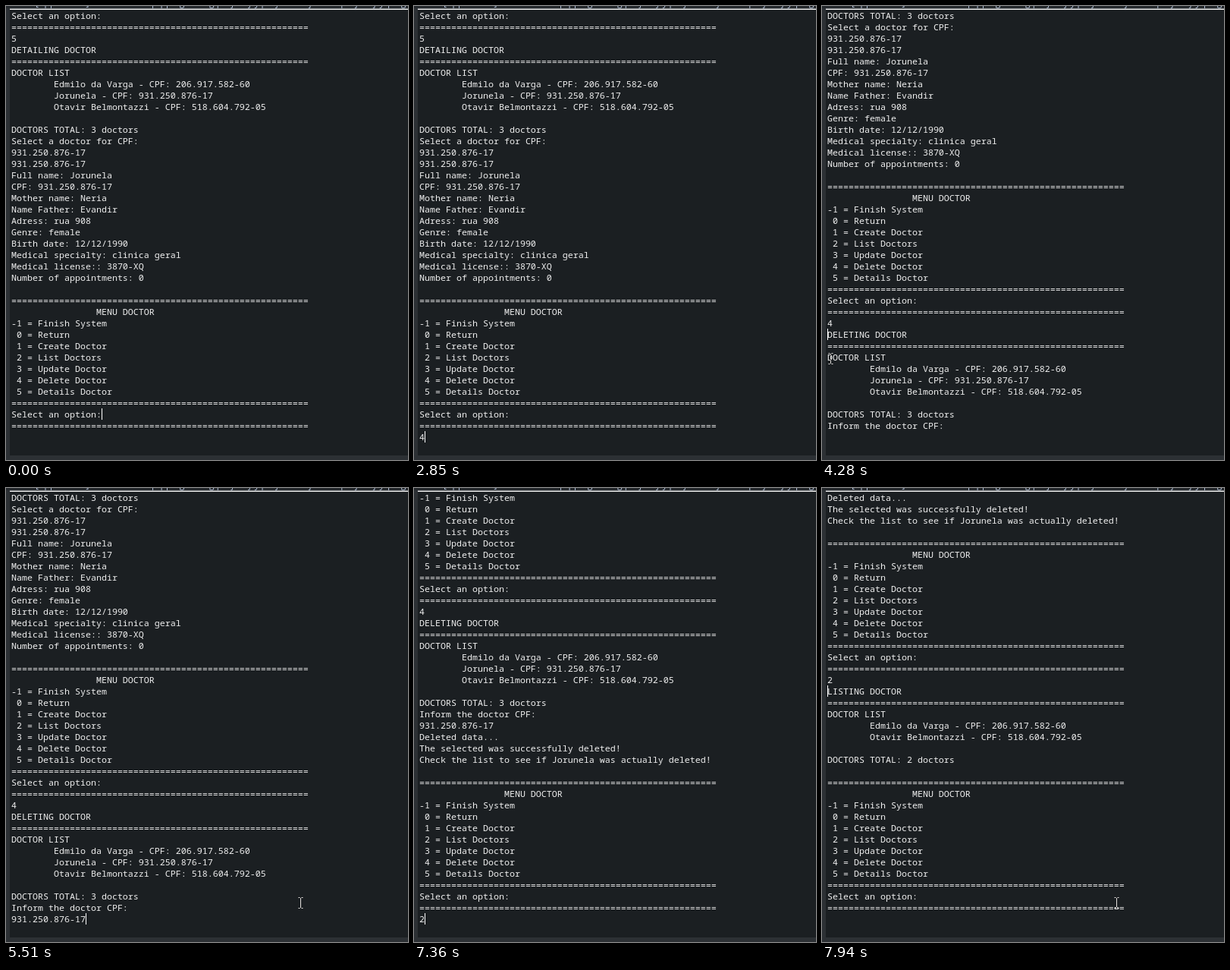
An HTML page that plays this animation: 530x598 px, repeating every 8 s.

```html
<!DOCTYPE html>
<html lang="en">
<head>
<meta charset="utf-8">
<title>Console session</title>
<style>
  html, body { margin: 0; width: 100%; height: 100%; overflow: hidden; background: #1b1f22; }
  svg { display: block; width: 530px; height: 598px; }
  text { white-space: pre; fill: #f0f0f0; }
  #log text { font-family: "Noto Sans Mono", "DejaVu Sans Mono", monospace; font-size: 11.667px; }
  #title { font-family: "Open Sans", "Noto Sans", sans-serif; font-size: 12px; fill: #b9c6dc; }
  #pointer { mix-blend-mode: difference; }
</style>
</head>
<body>
<svg viewBox="0 0 530 598">
  <defs><clipPath id="view"><rect x="5" y="5" width="525" height="587"/></clipPath></defs>
  <rect width="530" height="598" fill="#1b1f22"/>
  <rect width="5" height="598" fill="#2c3034"/>
  <rect y="592" width="530" height="6" fill="#2c3034"/>
  <rect width="530" height="3" fill="#24282c"/>
  <text id="title" x="8" y="0">clinic [Application] C:\work\tools\pq\plugins\org.project.jry.project.full.jre.win\project\jry\plugins\bin</text>
  <rect x="5" y="3" width="525" height="1" fill="#84878a"/>
  <rect x="5" y="4" width="525" height="1" fill="#f0f0f0"/>
  <g clip-path="url(#view)">
    <g id="log"></g>
    <rect id="caret" width="1" height="15" fill="#fff"/>
  </g>
  <path id="pointer" d="M-3 .5H-1M1 .5H3M-3 14.5H-1M1 14.5H3M0 1V14" fill="none" stroke="#fff"/>
</svg>
<script>
const LOOP = 8000, LINE = 15, CHAR = 7, LEFT = 7, TOP = 5;
const PAGE = 570, CARET_PAGE = 581;  // visible height after printing / after Enter
const BLINK = 526, REPLY_DELAY = 150;

const rule = '='.repeat(56);
const cpf = '931.250.876-17';
const tab = ' '.repeat(8);
const prompt = 'Select an option:';

const edmilo = 'Edmilo da Varga - CPF: 206.917.582-60';
const jorunela = 'Jorunela - CPF: ' + cpf;
const otavir = 'Otavir Belmontazzi - CPF: 518.604.792-05';

const list = (...people) => [
  rule, 'DOCTOR LIST', ...people.map(p => tab + p), '',
  `DOCTORS TOTAL: ${people.length} doctors`
];

const menu = [
  '', rule, tab + tab + 'MENU DOCTOR', '-1 = Finish System', ' 0 = Return',
  ...['Create Doctor', 'List Doctors', 'Update Doctor', 'Delete Doctor', 'Details Doctor']
    .map((label, i) => ` ${i + 1} = ${label}`),
  rule, prompt, rule
];

const intro = [
  prompt, rule, '5', 'DETAILING DOCTOR',
  ...list(edmilo, jorunela, otavir),
  'Select a doctor for CPF:', cpf, cpf,
  'Full name: Jorunela', 'CPF: ' + cpf, 'Mother name: Neria', 'Name Father: Evandir',
  'Adress: rua 908', 'Genre: female', 'Birth date: 12/12/1990',
  'Medical specialty: clinica geral', 'Medical license:: 3870-XQ', 'Number of appointments: 0',
  ...menu
];

const turns = [
  {
    type: 2850, enter: 3000, input: '4',
    reply: ['DELETING DOCTOR', ...list(edmilo, jorunela, otavir), 'Inform the doctor CPF:']
  },
  {
    click: 4700, type: 5250, enter: 6060, input: cpf,
    reply: ['Deleted data...', 'The selected was successfully deleted!',
      'Check the list to see if Jorunela was actually deleted!', ...menu]
  },
  {
    type: 7360, enter: 7790, input: '2',
    reply: ['LISTING DOCTOR', ...list(edmilo, otavir), ...menu]
  }
];

const entry = [11, 457], field = [16, 577], aside = [41, 569], corner = [388, 539];
const moves = [
  { start: 4280, end: 4400, from: entry },
  { start: 4550, end: 5390, from: field, to: aside, time: 430 },
  { start: 5390, end: 6060, from: aside, to: corner, time: 120 },
  { start: 7240, end: 7360, from: corner },
  { start: 7940, end: LOOP, from: corner }
];

const $ = id => document.getElementById(id);
const log = $('log'), caret = $('caret'), pointer = $('pointer');

const lines = [...intro, ...turns.flatMap(turn => [turn.input, ...turn.reply])];
const rows = lines.map((str, i) => {
  const row = document.createElementNS('http://www.w3.org/2000/svg', 'text');
  row.setAttribute('x', LEFT);
  row.setAttribute('y', TOP + i * LINE + 12);
  row.textContent = str;
  return log.appendChild(row);
});

const scrollFor = (count, page) => (count + 1) * LINE - page;

// Replays the session up to time t.
function sessionAt(t) {
  const s = { count: intro.length, scroll: 0, line: intro.length - 2, col: prompt.length, since: 0 };
  const on = (time, change) => {
    if (t >= time) Object.assign(s, change(), { since: time });
  };
  for (const { click, type, enter, input, reply } of turns) {
    on(click, () => ({ line: s.count, col: 0 }));
    on(type, () => ({ line: s.count, col: input.length, count: s.count + 1 }));
    on(enter, () => ({ line: s.count, col: 0, scroll: scrollFor(s.count, CARET_PAGE) }));
    on(enter + REPLY_DELAY, () => {
      const count = s.count + reply.length;
      return { count, scroll: scrollFor(count, PAGE) };
    });
  }
  return s;
}

function pointerAt(t) {
  const move = moves.find(m => t >= m.start && t < m.end);
  if (!move) return null;
  const { start, from, to = from, time = 1 } = move;
  const k = Math.min(1, (t - start) / time);
  return from.map((v, i) => Math.round(v + (to[i] - v) * k));
}

function show(el, visible) { el.style.display = visible ? '' : 'none'; }
function place(el, x, y) { el.setAttribute('transform', `translate(${x} ${y})`); }

function draw(t) {
  const { count, scroll, line, col, since } = sessionAt(t);
  rows.forEach((row, i) => show(row, i < count));
  place(log, 0, -scroll);

  show(caret, Math.floor((t - since) / BLINK) % 2 === 0);
  place(caret, LEFT + col * CHAR, TOP + line * LINE - scroll);

  const spot = pointerAt(t);
  show(pointer, spot);
  if (spot) place(pointer, spot[0] + 0.5, spot[1]);
}

const start = performance.now();
function tick() {
  draw((performance.now() - start) % LOOP);
  requestAnimationFrame(tick);
}
tick();
</script>
</body>
</html>
```
